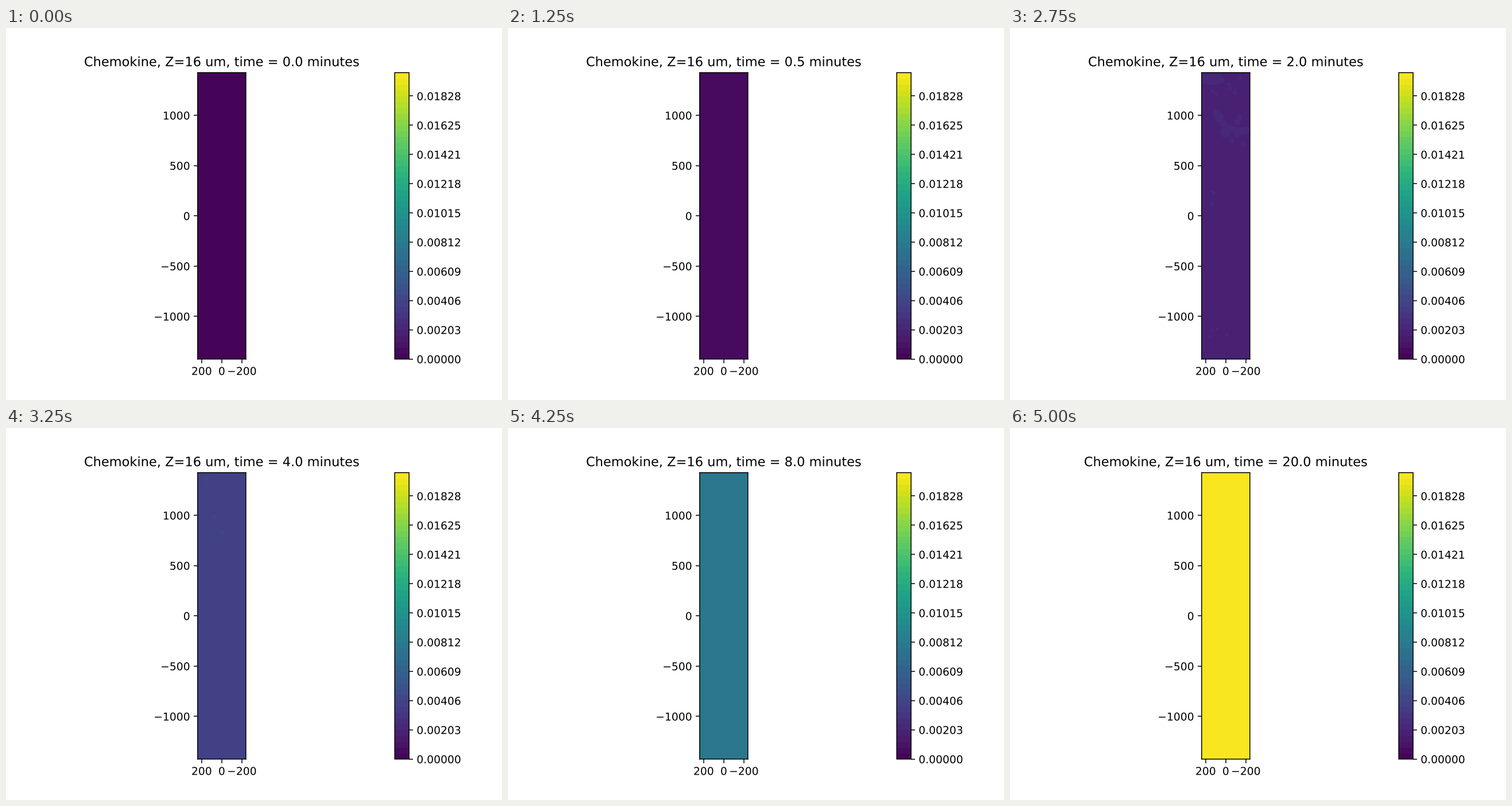
A matplotlib script that plays this animation: 864x648 px, repeating every 5250 ms.

```python
import numpy as np
import matplotlib.pyplot as plt
from matplotlib.animation import FuncAnimation
from matplotlib.patheffects import Normal

# unhinted glyphs and unsnapped frames keep sub-pixel positions
plt.rcParams.update({"text.hinting": "no_hinting", "path.snap": False})

TIMES = [i / 10 for i in range(10)] + list(range(1, 11)) + [20]  # minutes
RATE, DECAY = 0.000995, 0.0003
RIPPLE = 0.0000412
LEVELS = np.linspace(0, 0.0199004, 50)
HALF_W, HALF_H = 240, 1425

rng = np.random.default_rng(4)
X, Y = np.meshgrid(np.linspace(-HALF_W, HALF_W, 33),
                   np.linspace(-HALF_H, HALF_H, 191))


def bump(cx, cy, r, height=1.5):
    return height * np.exp(-((X - cx) ** 2 + (Y - cy) ** 2) / (2 * r * r))


def cluster(cx, cy, sx, sy, count, r):
    return [bump(rng.normal(cx, sx), rng.normal(cy, sy), r * rng.uniform(0.7, 1.2))
            for _ in range(count)]


def arc(count, r):
    # drops steeply on the left, then runs flat to the right edge
    for s in np.linspace(0, 1, count):
        yield bump(90 - 305 * s, 850 + 180 * (1 - s) ** 4, r * rng.uniform(0.85, 1.15))


def texture():
    bumps = list(arc(11, 33))
    bumps += cluster(155, 1365, 45, 35, 9, 42)     # top corner
    bumps += cluster(0, 1270, 110, 80, 9, 18)      # scatter below it
    bumps += cluster(-120, 940, 15, 25, 3, 27)     # above the arc
    bumps += cluster(-105, 775, 40, 30, 4, 26)     # below the arc
    bumps += cluster(150, 180, 30, 45, 4, 21)      # left pocket
    bumps += cluster(100, -1200, 110, 70, 4, 15)   # strays at the bottom
    for cx, cy in [(148, 1365), (72, 985), (5, 830)]:
        bumps.append(bump(cx, cy, 36, 2.4))
    return np.max(bumps, axis=0) * rng.uniform(0.85, 1.1, X.shape)


TEXTURE = texture()


def field(t):
    base = RATE * t * (1 - DECAY * t / 2)
    amp = RIPPLE * min(t / 2, 1) * np.exp(-max(t - 4, 0) / 2)
    return base + amp * TEXTURE


fig, ax = plt.subplots(figsize=(6.4, 4.8), dpi=135)


def contours(t):
    return ax.contourf(X, Y, field(t), levels=LEVELS, cmap="viridis")


layer = contours(0)
cbar = fig.colorbar(layer, ax=ax, ticks=LEVELS[::5], format="%.5f")
cbar.minorticks_off()
ax.set_aspect("equal", adjustable="box", anchor="C")
ax.set(xlim=(HALF_W, -HALF_W), ylim=(-HALF_H, HALF_H),
       xticks=[200, 0, -200], yticks=range(-1000, 1001, 500))

fig.canvas.draw()
labels = ax.get_xticklabels() + ax.get_yticklabels() + cbar.ax.get_yticklabels()
for text in labels + [ax.title]:
    text.set_path_effects([Normal()])


def update(i):
    global layer
    layer.remove()
    layer = contours(TIMES[i])
    ax.set_xlim(HALF_W, -HALF_W)
    ax.set_title(f"Chemokine, Z=16 um, time = {TIMES[i]:.1f} minutes")
    return []


anim = FuncAnimation(fig, update, frames=len(TIMES), interval=250,
                     repeat=True, repeat_delay=0, blit=False)
plt.show()
```
